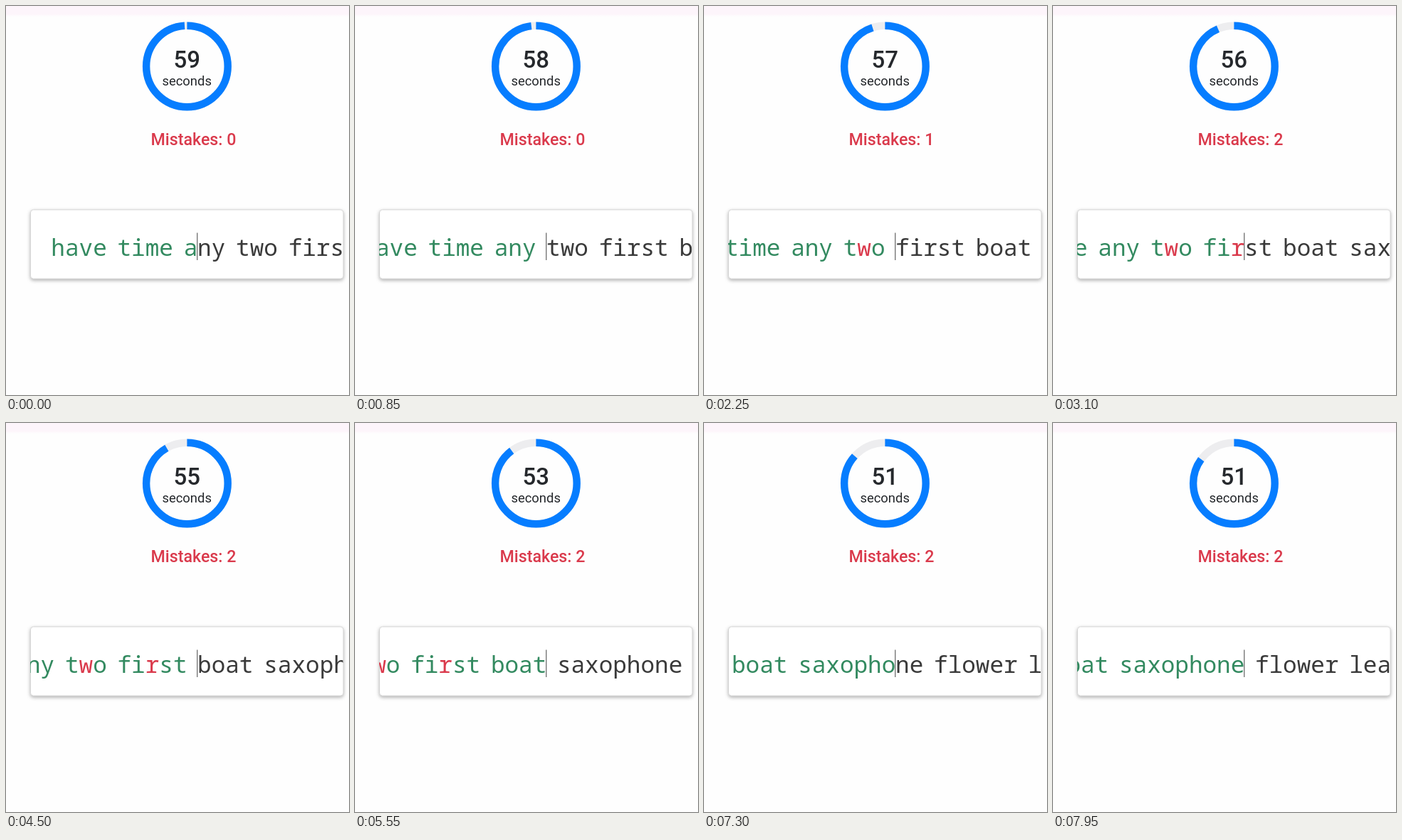
Write an HTML page that moves like this. It is 482 by 548 pixels and loops after 8000 ms.

```html
<!DOCTYPE html>
<html lang="en">
<head>
<meta charset="utf-8">
<title>Typing test</title>
<style>
  html, body { margin: 0; width: 100%; height: 100%; overflow: hidden; background: #fefefe; }
  svg { display: block; width: 482px; height: 548px; }
  text { font-family: Roboto, sans-serif; fill: #25282c; text-anchor: middle; }
  .count { font-size: 33px; font-weight: 500; }
  .unit { font-size: 18.4px; }
  .mistakes { font-size: 23.2px; font-weight: 500; fill: #da3a4c; }
  .ring { fill: none; stroke-width: 10.4; }
  .card { fill: #fff; stroke: #d6d6d6; filter: drop-shadow(0 2.5px 2.5px rgba(0, 0, 0, .3)); }
  .line text {
    font: 32.67px "Noto Sans Mono", monospace;
    word-spacing: -4.8px;
    white-space: pre;
    fill: #3a3a3a;
  }
  .line .done { text-anchor: end; }
  .line .todo { text-anchor: start; }
  .ok { fill: #338a60; }
  .bad { fill: #da3a4c; }
</style>
</head>
<body>
<svg viewBox="0 0 482 548">
  <defs>
    <linearGradient id="band" x2="0" y2="1">
      <stop offset=".75" stop-color="#fdf5fb"/>
      <stop offset="1" stop-color="#fefefe"/>
    </linearGradient>
    <clipPath id="inside"><rect x="34" y="288" width="439.5" height="96"/></clipPath>
  </defs>
  <rect width="482" height="15" fill="url(#band)"/>

  <g transform="translate(254.4 85)">
    <circle class="ring" r="57.3" stroke="#ededef"/>
    <circle class="ring" id="arc" r="57.3" stroke="#067dff" pathLength="60" transform="rotate(-90)"/>
  </g>
  <text class="count" id="count" x="254.3" y="87"></text>
  <text class="unit" x="254.2" y="112">seconds</text>
  <text class="mistakes" id="mistakes" x="263.5" y="196.4"></text>

  <rect class="card" x="34.5" y="287" width="439.5" height="97.2" rx="4"/>
  <g class="line" clip-path="url(#inside)">
    <text class="done" id="done" x="269.3" y="352"></text>
    <text class="todo" id="todo" x="269.1" y="352"></text>
  </g>
  <rect x="268.3" y="319.5" width="1" height="38.5" fill="#444"/>
</svg>
<script>
  const LOOP = 8000;
  const PHRASE = "have time any two first boat saxophone flower leaf";
  const START = 11;            // letters already typed when the loop begins
  const WRONG = [15, 20];      // positions of mistyped letters
  const TICKS = [-300, 750, 1550, 2600, 3750, 4600, 5450, 6500, 7300];
  const KEYS = [
    50, 300, 600,
    900, 1150, 1650, 1950,
    2600, 2800, 3000, 3300, 3800, 4050,
    4650, 4900, 5100, 5350, 5600,
    5850, 6100, 6450, 6650, 6850, 7050, 7300, 7550, 7800
  ];

  const el = id => document.getElementById(id);
  const passed = (list, t) => list.filter(at => at <= t).length;

  // cubic-bezier(.25, .1, .25, 1)
  function ease(x) {
    if (x <= 0) return 0;
    if (x >= 1) return 1;
    const curve = (a, b, u) => 3 * a * u * (1 - u) ** 2 + 3 * b * u * u * (1 - u) + u ** 3;
    let lo = 0, hi = 1;
    for (let i = 0; i < 20; i++) {
      const mid = (lo + hi) / 2;
      if (curve(.25, .25, mid) < x) lo = mid; else hi = mid;
    }
    return curve(.1, 1, lo);
  }

  function span(text, cls) {
    const node = document.createElementNS("http://www.w3.org/2000/svg", "tspan");
    node.setAttribute("class", cls);
    node.textContent = text;
    return node;
  }

  let shown = -1;
  function showTyped(n) {
    if (n === shown) return;
    shown = n;
    const wrong = WRONG.filter(w => w < n);
    const parts = [];
    let from = 0;
    for (const w of wrong) {
      parts.push(span(PHRASE.slice(from, w), "ok"), span(PHRASE[w], "bad"));
      from = w + 1;
    }
    parts.push(span(PHRASE.slice(from, n), "ok"));
    el("done").replaceChildren(...parts);
    el("todo").textContent = PHRASE.slice(n);
    el("mistakes").textContent = "Mistakes: " + wrong.length;
  }

  function draw() {
    const t = performance.now() % LOOP;
    const gap = TICKS.reduce((sum, at) => sum + ease((t - at) / 900), 0);
    el("arc").setAttribute("stroke-dasharray", `${60 - gap} ${gap}`);
    el("count").textContent = 60 - passed(TICKS, t);
    showTyped(START + passed(KEYS, t));
    requestAnimationFrame(draw);
  }
  draw();
</script>
</body>
</html>
```
